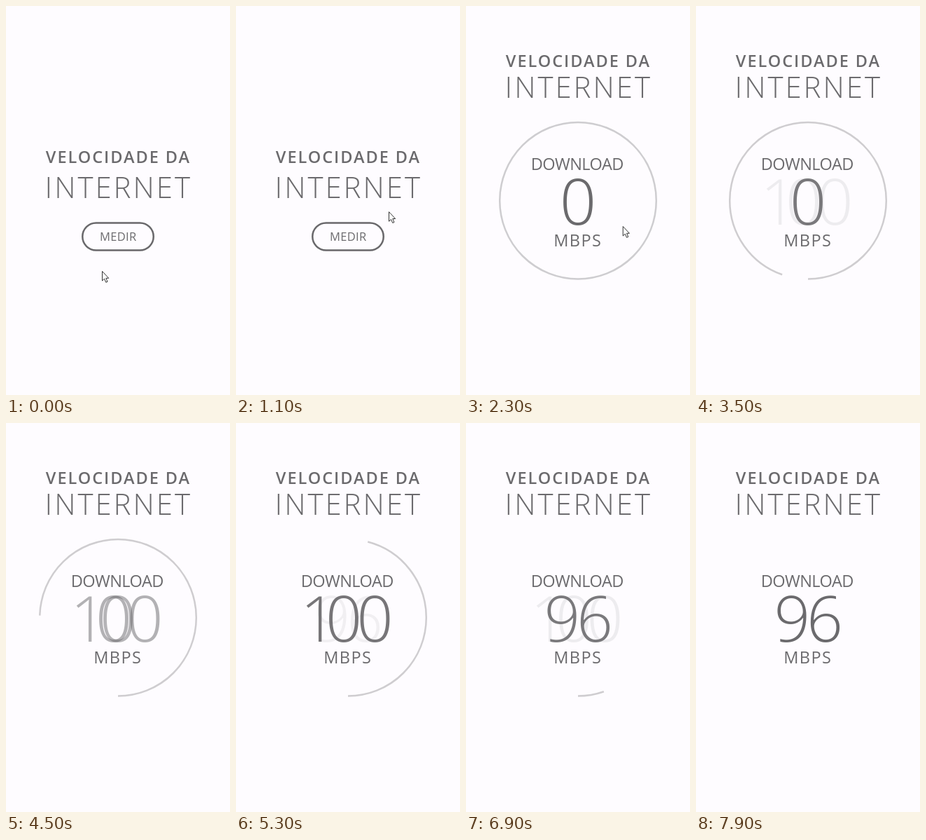
Animation, 320 px wide and 555 px high, one loop 8 s. Source, as an HTML page:

```html
<!DOCTYPE html>
<html lang="pt">
<head>
<meta charset="utf-8">
<title>Velocidade da Internet</title>
<style>
  html, body { margin: 0; width: 100%; height: 100%; overflow: hidden; background: #fefcff; }
  svg { display: block; width: 100vw; height: 100vh; }
  text { font-family: "Open Sans", "Noto Sans", sans-serif; fill: #6b6a6d; text-anchor: middle; }
  .label { font-size: 23.5px; }
  .digits text { font-size: 91px; font-weight: 300; }
</style>
</head>
<body>
<svg viewBox="0 0 320 555">
  <text id="title" class="label" x="160.5" y="224" font-weight="600" letter-spacing="1.97">VELOCIDADE DA</text>
  <text id="subtitle" x="160.8" y="274" font-size="42" font-weight="300" letter-spacing="3">INTERNET</text>
  <rect id="button" fill="none" stroke-width="2.5"/>
  <text id="medir" x="160.3" y="335" font-size="16.5" font-weight="500" letter-spacing=".3">MEDIR</text>
  <circle id="ring" cx="160" cy="277.7" r="111.8" fill="none" stroke="#cfcdd0" stroke-width="2.5"
    pathLength="360" transform="rotate(90 160 277.7)"/>
  <g id="panel">
    <text class="label" x="158.8" y="234" letter-spacing="-.5">DOWNLOAD</text>
    <g class="digits">
      <text id="zero" x="160" y="312">0</text>
      <text id="hundred" x="118 154 198.5" y="312">100</text>
      <text id="result" x="137.5 184" y="312">96</text>
    </g>
    <text class="label" x="159.8" y="343" letter-spacing="1.45">MBPS</text>
  </g>
  <path id="cursor" d="M.5 .5V14L3.5 11.2L5.8 16.3L8 15.3L5.8 10.3H9.7Z" fill="#fff" stroke="#333"/>
</svg>
<script>
const set = (id, attrs) => {
  const node = document.getElementById(id);
  for (const name in attrs) node.setAttribute(name, attrs[name]);
};
const mix = (a, b, p) => a + (b - a) * p;
const clamp = v => Math.max(0, Math.min(1, v));
const ramp = (t, from, to) => clamp((t - from) / (to - from));
const smooth = (t, from, to) => {
  const u = ramp(t, from, to);
  return u * u * (3 - 2 * u);
};

// The button grows into the ring while the headings rise
function drawOpening(t) {
  const p = smooth(t, 1350, 1880);
  set("title", { y: 224 - 137 * p });
  set("subtitle", { y: 274 - 143 * p });
  set("medir", { opacity: 1 - p });
  set("panel", { opacity: p });

  const w = mix(101.5, 223.6, p), h = mix(39, 223.6, p), cy = mix(329, 277.7, p);
  const tone = mix(105, 206, p);
  set("button", {
    x: 160 - w / 2, y: cy - h / 2, width: w, height: h, rx: h / 2,
    stroke: `rgb(${tone},${tone - 1},${tone + 2})`, opacity: t < 2500 ? 1 : 0
  });
}

// One sweep, fastest halfway, erases the ring and cross-fades 0, 100 and 96
function drawSweep(t) {
  const v = mix(-1, 1, ramp(t, 2500, 7900));
  const q = 1 + Math.sign(v) * (1 - (1 - Math.abs(v)) ** 2.25);
  const angle = 180 * q;
  set("ring", {
    "stroke-dasharray": `0 ${angle} ${360 - angle} 1`,
    opacity: t >= 2500 && angle < 360 ? 1 : 0
  });
  ["zero", "hundred", "result"].forEach((id, i) => set(id, { opacity: clamp(1 - Math.abs(q - i)) }));
}

// Jumps to the right, curves down to the button, then leaves the stage
function drawCursor(t) {
  const reach = smooth(t, 700, 1300), leave = ramp(t, 1800, 2800) ** 2;
  const x = t < 100 ? 137 : mix(298, 190, reach) + 135 * leave;
  const y = t < 100 ? 378 : mix(192, 315, reach ** 0.65) - 4 * leave;
  set("cursor", { transform: `translate(${x} ${y})` });
}

const start = performance.now();
function tick() {
  const elapsed = (performance.now() - start) % 8000;
  const t = Math.floor(elapsed / 100) * 100;
  drawOpening(t);
  drawSweep(t);
  drawCursor(t);
  requestAnimationFrame(tick);
}
tick();
</script>
</body>
</html>
```
